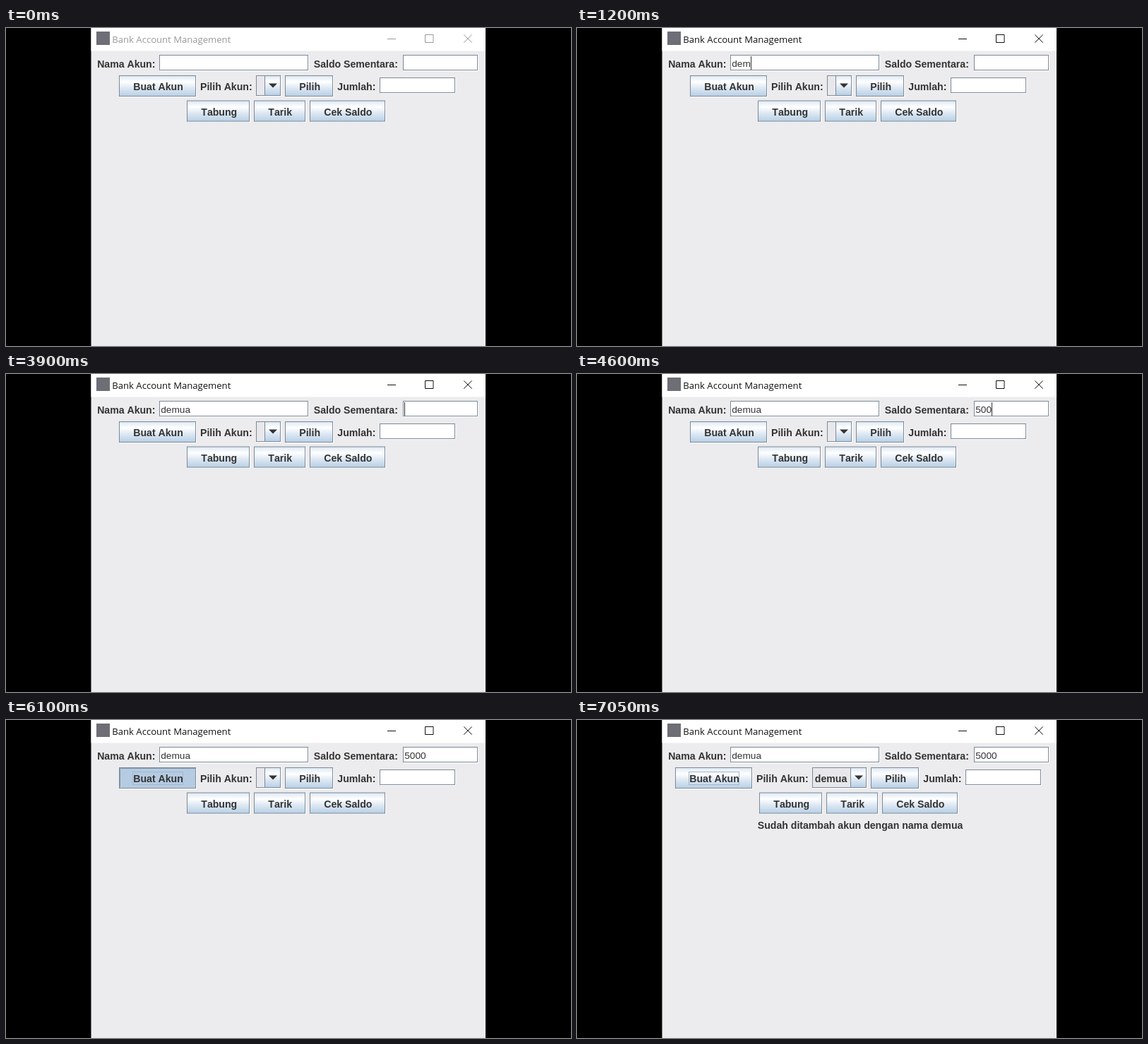
These frames come from a looping animation (800x450 px, 9.75 s). An HTML page:

```html
<!DOCTYPE html>
<html>
<head>
<meta charset="utf-8">
<style>
  html, body { margin: 0; width: 100%; height: 100%; overflow: hidden; background: #000; }
  svg { display: block; width: 800px; height: 450px; }
  text { font: bold 14.1px "Liberation Sans", Arial, sans-serif; font-kerning: none; fill: #333; white-space: pre; }
  .title { font: 13.1px "Open Sans", sans-serif; }
  .input { font: 13.7px "Liberation Sans", Arial, sans-serif; }
</style>
</head>
<body>
<svg id="stage" viewBox="0 0 800 450"></svg>
<script>
const LOOP = 9750, PRESS = 6050, RELEASE = 6200;
const NAME = 'demua', BALANCE = '5000', EDGE = '#7a8a99';
const stage = document.getElementById('stage');
const pen = document.createElement('canvas').getContext('2d');
pen.font = '13.7px "Liberation Sans", Arial, sans-serif';

// Each entry: when the field is clicked, when keys are hit, when focus leaves.
const nameKeys = { focus: 100, keys: [700, 900, 1080, 1350, 1700], blur: 3450 };
const balanceKeys = { focus: 3450, keys: [4000, 4250, 4550, 4750], blur: PRESS };

const defs = `<defs><linearGradient id="steel" x2="0" y2="1">
  <stop stop-color="#dde8f3"/><stop offset=".3" stop-color="#fff"/>
  <stop offset=".6" stop-color="#dde8f3"/><stop offset="1" stop-color="#b8cfe5"/>
</linearGradient></defs>`;

const rect = (x, y, w, h, fill, stroke = 'none') =>
  `<rect x="${x}" y="${y}" width="${w}" height="${h}" fill="${fill}" stroke="${stroke}"/>`;
const label = (x, y, str, cls = '', fill = '#333') =>
  `<text x="${x}" y="${y}" class="${cls}" style="fill:${fill}">${str}</text>`;
const path = (d, stroke, fill = 'none') => `<path d="${d}" stroke="${stroke}" fill="${fill}"/>`;

// Light line along the right and bottom of sunken parts
const shine = (x, y, w, h) => path(`M${x + 1} ${y + h + .5}H${x + w + .5}V${y + 1}`, '#fff');

const box = (x, y, w, h, fill) =>
  shine(x, y, w, h) + rect(x + .5, y + .5, w - 1, h - 1, fill, EDGE);

function button(x, y, w, str, { pressed, hover, focus } = {}) {
  let out = box(x, y, w, 30, pressed ? '#b5cbe2' : 'url(#steel)');
  if (pressed) out += path(`M${x + 1.5} ${y + 28}V${y + 1.5}H${x + w - 1}`, '#8398ae');
  if (hover) out += rect(x + 1.5, y + 1.5, w - 3, 27, 'none', '#b8cfe5');
  if (focus) out += rect(x + 19.5, y + 6.5, w - 38, 18, 'none', '#a3b8cc');
  return out + label(x + 20.3, y + 21, str);
}

function field(x, y, w, str = '', caret = false) {
  let out = box(x, y, w, 22, '#fff') + label(x + 2.2, y + 17.3, str, 'input');
  if (caret) {
    const cx = Math.round(x + 2 + pen.measureText(str).width) + .5;
    out += path(`M${cx} ${y + 2}V${y + 21}`, '#333');
  }
  return out;
}

function combo(x, w, str) {
  const split = x + w - 23, mid = split + 12;
  return box(x, 67, w, 29, '#e8e8ec') + rect(split + .5, 67.5, 22, 28, 'url(#steel)', EDGE) +
    path(`M${mid - 6} 78.5h12l-6 6z`, 'none', '#333') + label(x + 3.8, 87.5, str);
}

function typed(t, str, { focus, keys, blur }) {
  const hits = keys.filter(k => k <= t);
  const last = hits.length ? hits[hits.length - 1] : focus;
  const active = t >= focus && t < blur;
  return [str.slice(0, hits.length), active && (t - last) % 1000 < 500];
}

function scene(t) {
  const done = t >= RELEASE;
  const ink = t < 50 ? '#999' : '#111';
  const side = done ? 21 : 0, low = done ? 2 : 0;
  const make = {
    pressed: t >= PRESS && !done,
    hover: t >= 5900 && t < 6900 && !(t >= PRESS && !done),
    focus: t >= PRESS
  };
  return defs +
    rect(120.5, 0, 558.5, 450, '#ecebed') + rect(120.5, 0, 558.5, 32.5, '#fff') +
    rect(128, 5, 19, 19, '#6d6e76') +
    label(150.3, 20.8, 'Bank Account Management', 'title', ink) +
    path('M540 15.5H552M593.5 9.5H605V20.5H593.5ZM648.3 9.5L659.7 20.7M659.7 9.5L648.3 20.7', ink) +
    label(129.2, 55.5, 'Nama Akun:') + field(217, 38, 211, ...typed(t, NAME, nameKeys)) +
    label(435.8, 55.5, 'Saldo Sementara:') + field(562, 38, 106, ...typed(t, BALANCE, balanceKeys)) +
    button(160 - side, 67, 109, 'Buat Akun', make) +
    label(275 - side, 88, 'Pilih Akun:') +
    combo(354 - side, done ? 77 : 35, done ? NAME : '') +
    button(395 + side, 67, 68, 'Pilih') +
    label(469.3 + side, 88, 'Jumlah:') + field(529 + side, 70, 107) +
    button(256 + low, 102.5, 89, 'Tabung') +
    button(351 + low, 102.5, 73, 'Tarik') +
    button(430 + low, 102.5, 107, 'Cek Saldo') +
    (done ? label(255.8, 154, 'Sudah ditambah akun dengan nama ' + NAME) : '');
}

let shown = '';
const start = performance.now();
function tick() {
  const next = scene((performance.now() - start) % LOOP);
  if (next !== shown) stage.innerHTML = shown = next;
  requestAnimationFrame(tick);
}
tick();
</script>
</body>
</html>
```
